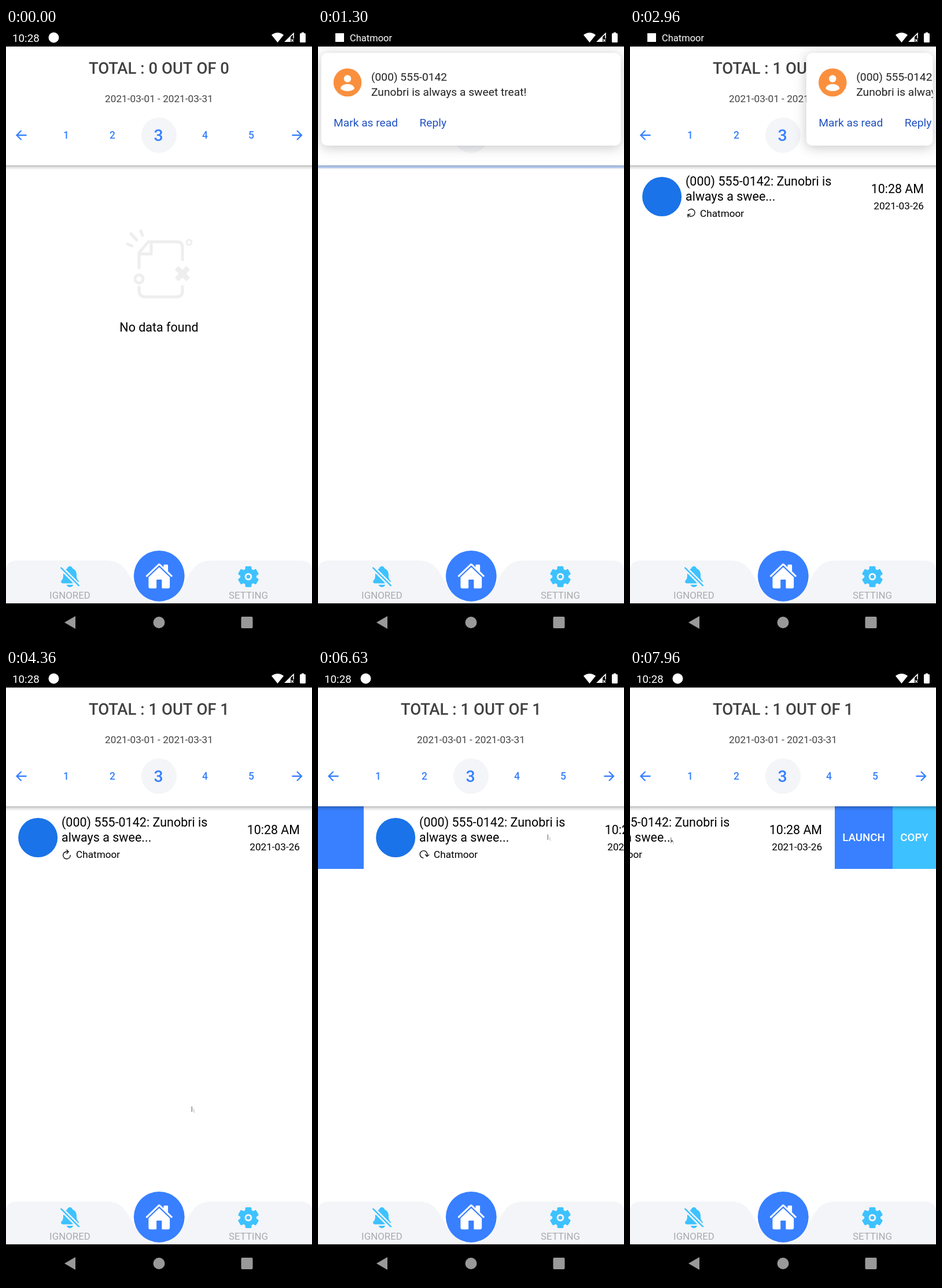
Recreate the animation shown at these times as an HTML page with a canvas. Size 529 by 1058 pixels, loop 8 s.

```html
<!DOCTYPE html>
<html lang="en">
<head>
<meta charset="utf-8">
<title>Notification list</title>
<style>
  html, body { margin: 0; width: 100%; height: 100%; overflow: hidden; background: #fff; }
  canvas { display: block; width: 529px; height: 1058px; }
</style>
</head>
<body>
<canvas id="stage" width="529" height="1058"></canvas>
<script>
const ctx = document.getElementById('stage').getContext('2d');
const W = 529, LOOP = 8000, STEP = 1000 / 15;
const BLUE = '#3880ff', SKY = '#3dc2ff', PALE = '#f4f5f8';
const PHONE = '(000) 555-0142', APP = 'Chatmoor', WORD = 'Zunobri';

// Rows of [time, value, ...]; linear between rows.
const CURSOR = [
  [1800, 300, 470], [2167, 250, 322], [2500, 145, 110], [2967, 442, 107],
  [3233, 500, 150], [3833, 321, 641], [4100, 320.5, 755], [5160, 320.5, 755],
  [5633, 310, 364], [5900, 302.5, 283], [6367, 302.5, 283], [6700, 420, 286],
  [6950, 420, 288], [7300, 261.5, 291], [7380, 261.5, 291], [7967, 70, 291]
];
const CARD_X = [[2500, 0], [2967, 299.5], [3233, 540]];
const ROW_X = [
  [6367, 0], [6433, 16], [6700, 100], [6950, 100], [7200, 0],
  [7400, 0], [7833, -158], [7967, -176]
];

// Icons on a 512 unit grid.
const HOME = 'M262 101a8 8 0 0 0-11 0L66 277a8 8 0 0 0-2 6V448a32 32 0 0 0 32 32H192a16 16 0 0 0 16-16V328a8 8 0 0 1 8-8h80a8 8 0 0 1 8 8v136a16 16 0 0 0 16 16h96a32 32 0 0 0 32-32V283a8 8 0 0 0-2-6z'
  + 'M491 244L416 173V64a16 16 0 0 0-16-16h-48a16 16 0 0 0-16 16v32l-58-55C273 35 265 32 256 32s-17 3-22 9L21 244A16 16 0 0 0 43 268L250 69a8 8 0 0 1 12 0L469 268A16 16 0 0 0 491 244z';
const BELL_OFF = 'M448 464a16 16 0 0 1-11-5l-384-384a16 16 0 0 1 22-22l384 384A16 16 0 0 1 448 464z'
  + 'M440 341C415 311 400 298 400 217C400 140 362 98 316 81C307 51 283 32 256 32S206 51 196 81Q184 86 174 92a8 8 0 0 0-1 13L434 367a8 8 0 0 0 14-7Q447 350 440 341z'
  + 'M112 217C112 298 97 311 72 341C54 363 69 400 102 400H313a8 8 0 0 0 5-14l-192-192a8 8 0 0 0-13 5Q112 208 112 217z'
  + 'M256 480a80 80 0 0 0 70-42a4 4 0 0 0-3-6H189a4 4 0 0 0-3 6A80 80 0 0 0 256 480z';
const REFRESH = 'M320 140Q312 134 256 134A160 160 0 1 0 416 294M256 58L336 138L256 218';

const clamp = v => Math.max(0, Math.min(1, v));
const progress = (t, a, b) => clamp((t - a) / (b - a));

function along(track, t) {
  let i = 1;
  while (i < track.length - 1 && t > track[i][0]) i++;
  const a = track[i - 1], b = track[i], p = progress(t, a[0], b[0]);
  return a.slice(1).map((v, k) => v + (b[k + 1] - v) * p);
}

function text(str, x, y, size, color, align = 'left', weight = 400) {
  ctx.font = `${weight} ${size}px Roboto, sans-serif`;
  ctx.textAlign = align;
  ctx.fillStyle = color;
  ctx.fillText(str, x, y);
}

function rect(x, y, w, h, color) {
  ctx.fillStyle = color;
  ctx.fillRect(x, y, w, h);
}

function disc(x, y, r, color) {
  ctx.fillStyle = color;
  ctx.beginPath();
  ctx.arc(x, y, r, 0, 7);
  ctx.fill();
}

function ring(x, y, r, color, width) {
  ctx.strokeStyle = color;
  ctx.lineWidth = width;
  ctx.beginPath();
  ctx.arc(x, y, r, 0, 7);
  ctx.stroke();
}

function rounded(x, y, w, h, r, color) {
  ctx.fillStyle = color;
  ctx.beginPath();
  ctx.roundRect(x, y, w, h, r);
  ctx.fill();
}

function fillPath(d, color) {
  ctx.fillStyle = color;
  ctx.fill(new Path2D(d));
}

function strokePath(d, color, width, cap = 'round') {
  ctx.strokeStyle = color;
  ctx.lineWidth = width;
  ctx.lineCap = cap;
  ctx.lineJoin = cap === 'round' ? 'round' : 'miter';
  ctx.stroke(new Path2D(d));
}

function group(draw) {
  ctx.save();
  draw();
  ctx.restore();
}

function icon(x, y, size, draw, angle = 0) {
  group(() => {
    ctx.translate(x, y);
    ctx.rotate(angle);
    ctx.scale(size / 512, size / 512);
    ctx.translate(-256, -256);
    draw();
  });
}

function statusBar(alert) {
  rect(0, 0, W, 32, '#000');
  if (alert < 1) group(() => {
    ctx.globalAlpha = 1 - alert;
    text('10:28', 11, 23.5, 18.8, '#fff');
    disc(82.5, 16.5, 9, '#fff');
  });
  if (alert > 0) group(() => {
    ctx.globalAlpha = alert;
    rect(30, 9, 15, 15, '#fff');
    text(APP, 55, 23, 16.5, '#fff');
  });
  fillPath('M459 12 Q469.5 4 480 12 L469.5 25Z', '#fff');
  strokePath('M491 23.3H483L497 9.5V18', '#fff', 1.6, 'butt');
  fillPath('M482 24L492 14V24Z', '#fff');
  strokePath('M493 19.5L497 23.5M497 19.5L493 23.5', '#fff', 1.3, 'butt');
  rounded(508, 9, 10, 16, 1.5, '#fff');
  rect(511, 7.5, 4, 2, '#fff');
}

function header(count) {
  rect(0, 32, W, 205, '#fff');
  text(`TOTAL : ${count} OUT OF ${count}`, 264.5, 79, 27.5, '#424242', 'center', 500);
  text('2021-03-01 - 2021-03-31', 264.5, 128, 17.2, '#444', 'center');
  disc(264.5, 185, 30.5, PALE);
  for (let n = 1; n <= 5; n++) {
    const on = n === 3;
    text(n, 24 + n * 80 - (on ? .5 : 0), on ? 195 : 191, on ? 28.5 : 17.5, BLUE, 'center', 500);
  }
  strokePath('M35.5 185H18.5M26.5 177L18.5 185L26.5 193', BLUE, 2.3, 'butt');
  strokePath('M494.5 185H511M503 177L511 185L503 193', BLUE, 2.3, 'butt');
}

function headerShadow(loading) {
  const g = ctx.createLinearGradient(0, 237, 0, 245);
  g.addColorStop(0, 'rgba(0,0,0,.28)');
  g.addColorStop(.4, 'rgba(0,0,0,.12)');
  g.addColorStop(1, 'rgba(0,0,0,0)');
  rect(0, 237, W, 8, g);
  if (loading) rect(0, 237, W, 5, 'rgba(56,128,255,.27)');
}

function emptyState() {
  const c = '#eee';
  strokePath('M230 414V388L246 369H296Q305 369 305 378V400M251 370V390H231', c, 5);
  strokePath('M230 447V453Q230 464 241 464H295Q305 464 305 454V446', c, 5);
  strokePath('M233 350L236 358M216 355L226 366M210 373L218 376', c, 5);
  strokePath('M295 414L315 434M315 414L295 434', c, 9, 'butt');
  ring(230, 433, 7, c, 5);
  ring(316.5, 370, 4.4, c, 3);
  text('No data found', 264.5, 524, 21.5, '#000', 'center');
}

function listRow(t) {
  const [x] = along(ROW_X, t);
  if (x > 0) rect(0, 237, 100, 108, BLUE);
  if (x < 0) {
    rect(354, 237, 100, 108, BLUE);
    rect(454, 237, 75, 108, SKY);
    text('LAUNCH', 404, 297, 18.7, '#fff', 'center', 500);
    text('COPY', 491.5, 297, 18.7, '#fff', 'center', 500);
  }
  group(() => {
    ctx.translate(x, 0);
    rect(0, 237, W, 108, '#fff');
    disc(55.2, 291, 34, '#1a73e8');
    text(`${PHONE}: ${WORD} is`, 96, 272, 21.5, '#000');
    text('always a swee...', 96, 298, 21.5, '#000');
    icon(105, 320, 20, () => strokePath(REFRESH, '#000', 34), (t - 4367) / 1000 * 2 * Math.PI);
    text(APP, 121, 326, 17.2, '#000');
    text('10:28 AM', 508, 285, 21.4, '#000', 'right');
    text('2021-03-26', 508, 313, 17.2, '#000', 'right');
  });
}

function gear() {
  group(() => {
    ctx.translate(419, 947);
    ctx.fillStyle = SKY;
    for (let i = 0; i < 6; i++) {
      ctx.beginPath();
      ctx.roundRect(-5.5, -18, 11, 18, 2);
      ctx.fill();
      ctx.rotate(Math.PI / 3);
    }
    disc(0, 0, 14, SKY);
    disc(0, 0, 6.3, PALE);
    disc(0, 0, 3.3, SKY);
  });
}

function tabBar() {
  fillPath('M0 993V937Q0 919 20 919H172C202 919 208 936 221 959C233 982 247 990 264.5 990C282 990 296 982 308 959C321 936 327 919 357 919H509Q529 919 529 937V993Z', PALE);
  icon(110.5, 947, 41, () => fillPath(BELL_OFF, SKY));
  gear();
  text('IGNORED', 110.5, 985, 16.9, '#a9abae', 'center');
  text('SETTING', 419, 985, 16.9, '#a9abae', 'center');
  disc(264.8, 945.8, 43.9, BLUE);
  icon(264.8, 945.8, 49, () => fillPath(HOME, '#fff'));
  rect(0, 993, W, 65, '#000');
  fillPath('M101 1026L120 1015V1037Z', '#999');
  disc(264.5, 1026, 10, '#999');
  rounded(406.5, 1016, 20, 20, 2, '#999');
}

function card(t) {
  const [x] = along(CARD_X, t);
  if (t < 500 || x >= 518) return;
  const enter = 1 - Math.pow(1 - progress(t, 440, 1030), 3);
  group(() => {
    ctx.beginPath();
    ctx.rect(0, 32, W, 300);
    ctx.clip();
    ctx.translate(0, -165 * (1 - enter));
    group(() => {
      ctx.shadowColor = 'rgba(0,0,0,.22)';
      ctx.shadowBlur = 20;
      ctx.shadowOffsetY = 3;
      rounded(5.5 + x, 43, 518 - x, 160, 10, '#fff');
    });
    ctx.beginPath();
    ctx.roundRect(5.5 + x, 43, 518 - x, 160, 10);
    ctx.clip();
    ctx.translate(x, 0);
    disc(51, 94, 24.3, '#fa903e');
    disc(51, 87.5, 6.2, '#fff');
    fillPath('M39 105C39 94 63 94 63 105Q58 109 51 109T39 105Z', '#fff');
    text(PHONE, 92, 91, 19.2, '#212121');
    text(`${WORD} is always a sweet treat!`, 92, 117, 19.2, '#212121');
    text('Mark as read', 27, 170, 19.2, '#1f50c0');
    text('Reply', 175.5, 170, 19.2, '#1f50c0');
  });
}

function cursor(t) {
  if (t < CURSOR[0][0]) return;
  const [x, y] = along(CURSOR, t);
  group(() => {
    ctx.translate(x, y);
    strokePath('M.8 0V9.5', '#666', 1.1, 'butt');
    strokePath('M2.5 4L5.5 7.5M3.5 7L5.5 11', '#aaa', .9, 'butt');
  });
}

function draw(t) {
  const loading = t >= 1296 && t < 1700;
  rect(0, 0, W, 1058, '#fff');
  if (t < 1296) emptyState();
  if (t >= 1700) listRow(t);
  header(t < 1700 ? 0 : 1);
  headerShadow(loading);
  tabBar();
  statusBar(progress(t, 480, 680) * (1 - progress(t, 3230, 3430)));
  card(t);
  cursor(t);
}

function tick(now) {
  const t = now % LOOP;
  draw(Math.max(0, 500 + Math.floor((t - 492) / STEP) * STEP));
  requestAnimationFrame(tick);
}
requestAnimationFrame(tick);
</script>
</body>
</html>
```
